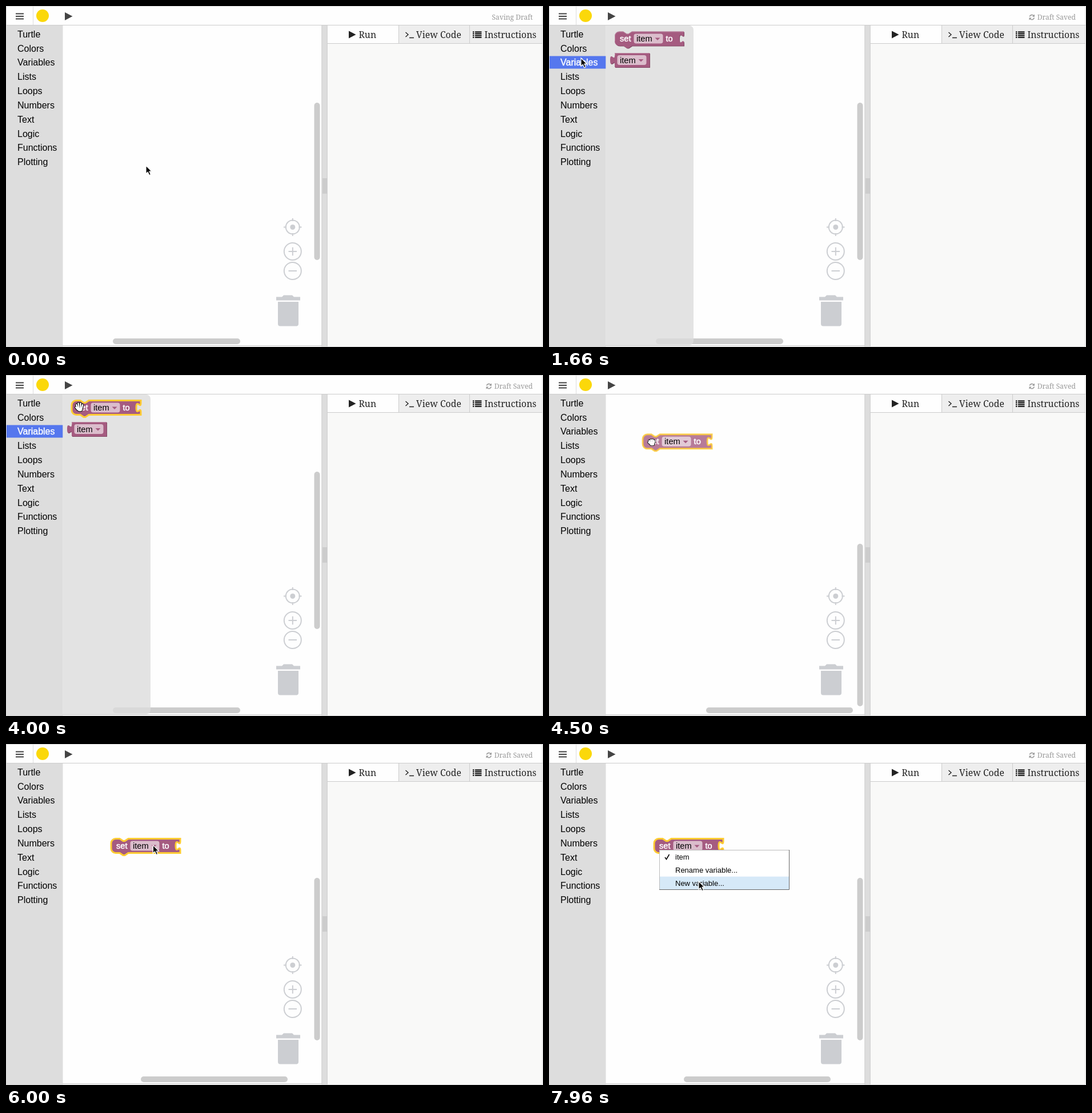
Write an HTML page that moves like this. It is 940 by 596 pixels and loops after 8000 ms.

```html
<!DOCTYPE html>
<html lang="en">
<head>
<meta charset="utf-8">
<title>Block editor</title>
<style>
  html, body { margin: 0; width: 100%; height: 100%; overflow: hidden; background: #fff; }
  svg { display: block; width: 100%; height: 100%; }
  text { font-family: "Liberation Sans", Arial, sans-serif; white-space: pre; }
  .serif { font-family: "Noto Serif", serif; }
  .tab { font-size: 15.8px; fill: #222; }
  .status { font-size: 12.1px; fill: #999; }
  .category { font-size: 16px; }
  .category.on { fill: #fff; stroke: #fff; stroke-width: .4; }
  .label { font-size: 14.67px; fill: #fff; stroke: #fff; stroke-width: .5; }
  .value { font-size: 14.67px; }
  .option { font-size: 13px; }
  .selected .body { stroke: #fc3; stroke-width: 3; }
  .selected .edge { display: none; }
  .dragging .body { fill-opacity: .8; stroke-opacity: .8; }
  .field { fill: #fff; fill-opacity: .6; }
  .hover .field { stroke: #fff; stroke-width: 2; }
</style>
</head>
<body>
<svg viewBox="0 0 940 596">
  <defs>
    <path id="setShape" d="M0 8A8 8 0 0 1 8 0H15l6 4h3l6-4H121v5c0 10-8-8-8 7.5s8-2.5 8 7.5v5H30l-6 4h-3l-6-4H8a8 8 0 0 1-8-8z"/>
    <path id="getShape" d="M0 0H61V25H0V20c0-10-8 8-8-7.5s8 2.5 8-7.5z"/>
    <g id="field">
      <rect class="field" width="51" height="17" rx="4"/>
      <text class="value" x="4.5" y="13.5">item</text>
      <path d="M37 7h9l-4.5 4.5z" fill="#a55b80"/>
    </g>
    <path id="openLines" d="M-3 3L-5.3-3.5M-1 2L-2-6M1.8 2L2-6M4 3L5.6-3.6M-3 5L-6.3 1M-2 4L-1 6.5H3L4 3M0 3V5H2V3"/>
    <path id="fistLines" d="M-4 0L-4-2M-1 0V-3.3M2 0V-3.3M4.5 1V-2M-4 2L-5 1M-3 2L-1 5H3L4 1M-2 1H3V3H0"/>
  </defs>

  <rect width="940" height="596" fill="#fefefe"/>
  <rect x="562" y="66" width="377" height="529" fill="#f9f9f8"/>

  <!-- toolbar -->
  <path d="M17 13.5H31M17 18H31M17 22.5H31" stroke="#444" stroke-width="2"/>
  <path d="M47.5 1V33" stroke="#ddd"/>
  <circle cx="64" cy="17" r="11" fill="#fbd80a"/>
  <path d="M103 11L116.500 18L103 25z" fill="#444"/>
  <text id="saving" class="serif status" x="922" y="23.500" text-anchor="end">Saving Draft</text>
  <g id="saved">
    <text class="serif status" x="922" y="23.500" text-anchor="end">Draft Saved</text>
    <path d="M841.300 18.500A4.200 4.200 0 0 1 848.500 17M849.300 20.500A4.200 4.200 0 0 1 842 22.300" fill="none" stroke="#999" stroke-width="1.600"/>
    <path d="M850 14.500V18.700H845.800zM840.500 24.700V20.500H844.700z" fill="#999"/>
  </g>

  <!-- workspace controls -->
  <g fill="#ccc">
    <rect id="barV" x="539.500" width="10" rx="5"/>
    <rect id="barH" y="581" height="10" rx="5"/>
  </g>
  <g fill="none" stroke="#ccced2" stroke-width="2">
    <circle cx="501.800" cy="386.500" r="12"/>
    <path d="M501.800 371V376M501.800 397V402M486 386.500H491M512.500 386.500H517.500"/>
    <circle cx="501.800" cy="429" r="15"/>
    <circle cx="501.800" cy="463" r="15"/>
    <path d="M494.500 429H509M501.800 421.700V436.300M494.500 463H509"/>
  </g>
  <g fill="#ccced2">
    <circle cx="501.800" cy="386.500" r="4.500"/>
    <path d="M473 508.500H483L486 505.500H501L504 508.500H515V514.500H473zM476 517H512V555.500a4 4 0 0 1-4 4H480a4 4 0 0 1-4-4z"/>
  </g>

  <rect x="1" y="34" width="98.500" height="561" fill="#ddd"/>
  <rect id="picked" x="1" y="87.500" width="98.500" height="22" fill="#57e"/>
  <g id="categories"></g>

  <!-- splitter and tabs -->
  <rect x="553" y="34" width="9" height="561" fill="#ddd"/>
  <rect x="554" y="301" width="8" height="27" fill="#ccc"/>
  <rect x="687" y="34" width="252" height="31" fill="#eee"/>
  <path d="M0 33.500H940M99 593.500H553M562 65.500H939M687.500 34V65M811.500 34V65M552.800 34V595M562.300 34V595" stroke="#ccc" fill="none"/>
  <path d="M600 43.500L612.500 50L600 56.500z" fill="#222"/>
  <path d="M699.500 46L704 50L699.500 54M706 55.500H714" fill="none" stroke="#222" stroke-width="1.400"/>
  <path d="M817 45.300H819.500M817 48.400H819.500M817 51.600H819.500M817 54.800H819.500M821 45.300H832.500M821 48.400H832.500M821 51.600H832.500M821 54.800H832.500" stroke="#222" stroke-width="2.300"/>
  <g class="serif">
    <text class="serif tab" x="617.500" y="55.500">Run</text>
    <text class="serif tab" x="718" y="55.500">View Code</text>
    <text class="serif tab" x="837.500" y="55.500">Instructions</text>
  </g>
  <rect x=".5" y=".5" width="938.500" height="595" fill="none" stroke="#d5d5d5"/>

  <g id="flyout">
    <path d="M99.500 34H245a8 8 0 0 1 8 8V585a8 8 0 0 1-8 8H99.500z" fill="#ddd" fill-opacity=".8"/>
    <g transform="translate(115 82)">
      <use href="#getShape" x="1" y="1" fill="#844966"/>
      <use href="#getShape" fill="#a55b80"/>
      <path d="M.5 4.500V.5H60.500" fill="none" stroke="#c08ca6"/>
      <use href="#field" x="4.500" y="4"/>
    </g>
  </g>

  <g id="block">
    <use class="edge" href="#setShape" x="1" y="1" fill="#844966"/>
    <use class="body" href="#setShape" fill="#a55b80"/>
    <path class="edge" d="M.5 17V8A7.500 7.500 0 0 1 8 .5H15l6 4h3l6-4H120.500" fill="none" stroke="#c08ca6"/>
    <text class="label" x="9" y="17.500">set</text>
    <use href="#field" x="33.500" y="4"/>
    <text class="label" x="89.500" y="17.500">to</text>
  </g>

  <g id="menu">
    <rect x="193" y="185" width="228" height="70" fill="#fff"/>
    <rect id="rowMark" x="194" width="226" height="23" fill="#d6e9f8"/>
    <path d="M193.500 255V185.500H421" fill="none" stroke="#bbb"/>
    <path d="M193 254.500H420.500V185" fill="none" stroke="#666"/>
    <path d="M203 198L205.500 201.500L210.500 193" fill="none" stroke="#000" stroke-width="1.500"/>
    <text class="option" x="221" y="202">item</text>
    <text class="option" x="221" y="224.500">Rename variable...</text>
    <text class="option" x="221" y="247.500">New variable...</text>
  </g>

  <g id="arrow">
    <path d="M0 0V14.200L3.300 11.200L5.700 16.700L8.300 15.600L6 10.200H10.300z" stroke="#fff" stroke-width="1.200"/>
  </g>
  <g id="open" fill="none" stroke-linecap="round" stroke-linejoin="round">
    <use href="#openLines" stroke="#000" stroke-width="4.400"/>
    <use href="#openLines" stroke="#fff" stroke-width="2.400"/>
  </g>
  <g id="fist" fill="none" stroke-linecap="round" stroke-linejoin="round">
    <use href="#fistLines" stroke="#000" stroke-width="4.600"/>
    <use href="#fistLines" stroke="#fff" stroke-width="2.800"/>
  </g>
</svg>
<script>
const LOOP = 8000;
const SAVED = 500, FLYOUT = 1500, PRESS = 3880, DRAG = 4090, DROP = 4880, MENU = 6560;
const $ = id => document.getElementById(id);
const show = (id, on) => $(id).style.display = on ? '' : 'none';
const move = (id, x, y) => $(id).setAttribute('transform', `translate(${x} ${y})`);

const smooth = u => u * u * (3 - 2 * u);
const easeIn = u => u ** 1.4;
const easeOut = u => 1 - (1 - u) ** 1.6;

// Pointer stops: time, x, y, easing towards the stop
const path = [
  [0, 245, 279], [350, 245, 279], [1300, 56, 91, smooth], [2300, 56, 91],
  [3200, 128, 52, smooth], [DRAG, 128, 52], [4500, 177, 111, easeIn],
  [4850, 197, 173, easeOut], [5300, 197, 173], [6100, 260, 177, smooth],
  [7050, 260, 177], [7750, 262, 240, smooth], [LOOP, 262, 240]
];

function pointerAt(t) {
  const i = path.findIndex(stop => stop[0] > t);
  const [t0, x0, y0] = path[i - 1], [t1, x1, y1, ease = smooth] = path[i];
  const u = ease((t - t0) / (t1 - t0));
  return [x0 + (x1 - x0) * u, y0 + (y1 - y0) * u];
}

const names = ['Turtle', 'Colors', 'Variables', 'Lists', 'Loops', 'Numbers', 'Text', 'Logic', 'Functions', 'Plotting'];
$('categories').innerHTML = names.map((name, i) =>
  `<text class="category" x="20" y="${54.8 + i * 24.83}">${name}</text>`).join('');
const variables = $('categories').children[2];

function setBars(top, height, left, width) {
  $('barV').setAttribute('y', top);
  $('barV').setAttribute('height', height);
  $('barH').setAttribute('x', left);
  $('barH').setAttribute('width', width);
}

function draw(t) {
  const [px, py] = pointerAt(t);
  const flyout = t >= FLYOUT && t < DRAG, dragging = t >= DRAG && t < DROP;

  show('saving', t < SAVED);
  show('saved', t >= SAVED);
  show('flyout', flyout);
  show('picked', flyout);
  variables.classList.toggle('on', flyout);

  if (t < DRAG) setBars(169, 275, 187, 223);
  else if (dragging) setBars(295, 284, 275, 257);
  else setBars(234, 284, 236, 257);

  const [hx, hy] = t < DRAG ? [128, 52] : dragging ? [px, py] : [197, 173];
  const bx = hx - 13, by = hy - 7.5;
  move('block', bx, by);
  show('block', t >= FLYOUT);

  const inside = t >= FLYOUT && px >= bx && px < bx + 121 && py >= by && py < by + 25;
  const onField = inside && px > bx + 33 && px < bx + 85;
  const block = $('block').classList;
  block.toggle('selected', t >= PRESS);
  block.toggle('dragging', dragging);
  block.toggle('hover', onField);

  const row = Math.floor((py - 186) / 23);
  show('menu', t >= MENU);
  show('rowMark', row >= 0);
  $('rowMark').setAttribute('y', 185.7 + Math.min(row, 2) * 23);

  const hand = inside && !onField;
  show('arrow', !hand);
  show('open', hand && !dragging);
  show('fist', hand && dragging);
  move('arrow', px, py);
  move('open', px + .5, py + 3.5);
  move('fist', px + 2.5, py + 5.5);
}

const start = performance.now();
function tick() {
  draw((performance.now() - start) % LOOP);
  requestAnimationFrame(tick);
}
tick();
</script>
</body>
</html>
```
